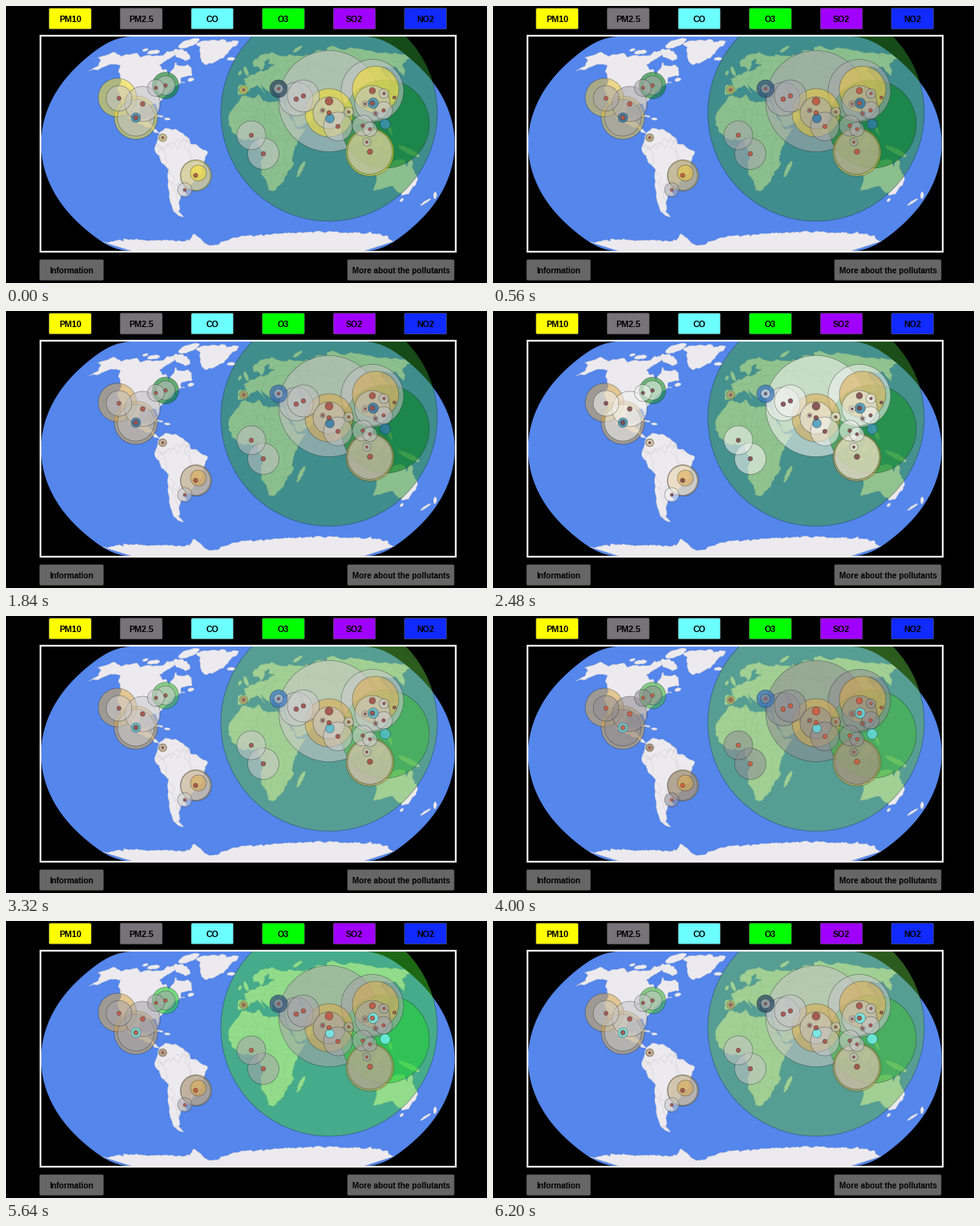
Write a matplotlib script that moves like this. It is 600 by 345 pixels and loops after 6240 ms.

```python
import matplotlib.pyplot as plt
import numpy as np
from matplotlib.animation import FuncAnimation
from matplotlib.colors import to_rgb
from matplotlib.patches import Circle, FancyBboxPatch, Polygon, Rectangle

W, H, DPI = 600, 345, 100
FRAMES, STEP = 156, 40
PX = 72 / DPI
OCEAN, LAND, BORDER = "#5486ec", "#eceaee", "#cbc9d0"
rng = np.random.default_rng(5)

fig = plt.figure(figsize=(W / DPI, H / DPI), dpi=DPI, facecolor="black")
ax = fig.add_axes([0, 0, 1, 1])
ax.set(xlim=(0, W), ylim=(H, 0))
ax.axis("off")


# --- map -------------------------------------------------------------
def project(points):
    """Natural Earth projection to stage pixels."""
    lon, lat = np.radians(np.array(points, float)).T
    a = lat ** 2
    b = a * a
    x = lon * (0.8707 - 0.131979 * a + b * (-0.013791 + b * (0.003971 * a - 0.001529 * b)))
    y = lat * (1.007226 + a * (0.015085 + b * (-0.044475 + 0.028874 * a - 0.005916 * b)))
    return np.column_stack([301.7 + 94.3 * x, 171.8 - 94.3 * y])


def roughen(points, depth=3, amount=0.09):
    """Fractal coast: displace the midpoint of every edge."""
    p = np.array(points, float)
    for _ in range(depth):
        edge = np.roll(p, -1, axis=0) - p
        normal = edge[:, ::-1] * (-1, 1)
        mid = p + edge / 2 + normal * rng.normal(0, amount, (len(p), 1))
        p = np.stack([p, mid], axis=1).reshape(-1, 2)
    return p


def fill(points, color=LAND):
    shape = Polygon(project(points), fc=color, ec=BORDER, lw=0.4 * PX, zorder=1)
    ax.add_patch(shape)
    shape.set_clip_path(globe)
    return shape


def continent(points, spacing=0):
    """Rough outline, crossed by wandering borders about spacing degrees apart."""
    shape = fill(roughen(points))
    if not spacing:
        return
    low, high = np.min(points, axis=0), np.max(points, axis=0)
    for axis in (0, 1):
        for v in np.arange(low[axis] + spacing, high[axis], spacing):
            s = np.linspace(low[1 - axis], high[1 - axis], 24)
            wander = v + np.cumsum(rng.normal(0, spacing / 7, 24))
            pts = np.column_stack([wander, s] if axis == 0 else [s, wander])
            line, = ax.plot(*project(pts).T, color=BORDER, lw=0.4 * PX, zorder=2)
            line.set_clip_path(shape)


def isle(x0, y0, x1, y1, width, color=LAND):
    """Spindle-shaped island between two ends."""
    a = np.linspace(0, 2 * np.pi, 12, endpoint=False)[:, None]
    mid, half = np.array([x0 + x1, y0 + y1]) / 2, np.array([x1 - x0, y1 - y0]) / 2
    side = half[::-1] * (-1, 1) / np.hypot(*half) * width
    fill(roughen(mid + half * np.cos(a) + side * np.sin(a), 1), color)


lats = np.linspace(-90, 90, 91)
rim = [(-180, v) for v in lats] + [(180, v) for v in lats[::-1]]
globe = ax.add_patch(Polygon(project(rim), fc=OCEAN, lw=0, zorder=0))

# North America
continent([(-168, 66), (-157, 71), (-128, 70), (-96, 68), (-94, 72), (-82, 69), (-87, 65),
           (-94, 60), (-82, 54), (-79, 51), (-77, 58), (-78, 62), (-70, 59), (-64, 60),
           (-56, 52), (-66, 50), (-65, 46), (-61, 46), (-70, 43), (-76, 36), (-81, 31),
           (-80, 25.5), (-84, 30), (-97, 28), (-97, 21), (-91, 18.5), (-87, 21), (-88, 16),
           (-83.5, 14), (-82, 9), (-77.5, 8), (-87, 12.5), (-97, 16), (-105.5, 20),
           (-113, 31), (-110, 23), (-117, 32.5), (-124, 41), (-124, 48), (-134, 58),
           (-147, 60.5), (-163, 55), (-158, 59)])
# Greenland
continent([(-73, 78.5), (-58, 75.5), (-51, 64), (-44, 60), (-23, 70), (-12, 81.5),
           (-32, 83.6), (-60, 82)])
# South America
continent([(-77.5, 8), (-72, 12), (-62, 10.5), (-51, 4), (-50, 0), (-35, -6), (-39, -14),
           (-41, -22), (-48, -26), (-54, -34), (-58, -34), (-57, -38), (-65, -42),
           (-69, -51), (-66, -55), (-74, -51), (-73, -37), (-70, -19), (-76, -14),
           (-81, -5), (-80, 0)], 14)
# Eurasia
continent([(-9, 37), (-2, 37), (3, 42), (9, 44), (16, 38), (13, 45), (22.5, 37), (23, 40.5),
           (29, 41), (27, 37), (36, 36.5), (35, 28), (43, 13), (55, 17), (59.5, 22.5),
           (48, 30), (57, 27), (67, 25), (73, 18), (77.5, 8), (80, 15), (90, 22), (94, 16),
           (98, 15), (103, 1.5), (100, 13), (105, 9), (108, 20), (114, 22.5), (121, 28),
           (119, 38), (126, 35), (129, 38), (140, 48), (136, 54.5), (143, 59), (155, 59),
           (156, 51), (164, 60), (180, 65), (180, 69), (140, 72.5), (110, 74), (104, 77),
           (80, 72), (67, 69), (44, 67), (40, 67), (28, 71), (15, 68.5), (5, 62), (6, 58.5),
           (12, 58), (14, 55.5), (18, 60), (18, 62.5), (24, 65.5), (22, 61), (29, 60),
           (21, 56), (10, 54), (4, 52), (-4, 48.5), (-1, 44), (-9, 43.5)], 17)
# Africa
continent([(-6, 35.5), (10, 37), (20, 31), (32, 31), (37, 20), (43, 11.5), (51, 12),
           (41, -2), (39.5, -8), (40.5, -15), (35, -21), (32.5, -28), (26, -34),
           (19, -34.5), (12, -17), (13.5, -8), (9, 0), (9, 4.5), (-8, 4.5), (-17, 14.5),
           (-17, 21), (-10, 30)], 10)
# Australia
continent([(114, -23), (122, -18), (130, -12), (136, -12), (140.5, -17.5), (142.5, -11),
           (146, -19), (153, -27), (150, -37.5), (144, -38.5), (136, -34), (130, -31.5),
           (116, -35)])

isle(29, 43, 41, 42.5, 1.6, OCEAN)        # Black Sea
isle(49, 46, 52.5, 37, 2, OCEAN)          # Caspian Sea
isle(-85, 22, -75, 20.3, 0.7)             # Cuba
isle(-74, 19, -68.5, 18.5, 0.8)           # Hispaniola
isle(-64, 65, -88, 73, 3)                 # Baffin
isle(-86, 77, -65, 82.5, 5)               # Ellesmere
isle(-117, 71, -103, 71, 2)               # Victoria
isle(-125, 73, -119, 73, 1.3)             # Banks
isle(-59, 48, -53, 48.5, 1.4)             # Newfoundland
isle(-23, 65, -14, 65, 1.4)               # Iceland
isle(-4, 58.5, 0.5, 51, 1.8)              # Great Britain
isle(-9.5, 52, -6.5, 55, 1.4)             # Ireland
isle(53, 71, 67, 76.5, 1.3)               # Novaya Zemlya
isle(44, -25, 50, -13, 1.8)               # Madagascar
isle(131, 32, 142, 42, 1.2)               # Japan
isle(141, 42.5, 145, 44, 1.1)             # Hokkaido
isle(142.5, 46, 142.5, 54, 0.7)           # Sakhalin
isle(120.5, 18.5, 126, 6.5, 1.3)          # Philippines
isle(95.5, 5.5, 105.5, -5.5, 1.6)         # Sumatra
isle(105.5, -6.7, 115, -8.3, 0.7)         # Java
isle(111, -2.5, 117.5, 6, 3)              # Borneo
isle(120, -5, 122, 1, 1)                  # Sulawesi
isle(131, -1.5, 150, -9.5, 2)             # New Guinea
isle(173.5, -36, 177.5, -41, 1.2)         # New Zealand
isle(167.5, -46, 173.5, -41, 1.2)
isle(145, -42, 148, -42, 1.3)             # Tasmania

# Antarctica: a tilted cap with two bays and a peninsula
lon = np.linspace(-180, 180, 150)
bump = lambda centre, width: np.exp(-((lon - centre) / width) ** 2)
coast = (-71.5 + 4 * np.sin(np.radians(lon)) - 6.5 * bump(-45, 17) + 8 * bump(-61, 6)
         - 5 * (bump(-180, 22) + bump(180, 14)) + rng.normal(0, 0.5, lon.size))
fill(np.vstack([np.column_stack([lon, coast]),
                np.column_stack([lon[::-1], np.full(lon.size, -90)])]))


# --- pollution marks ---------------------------------------------------
def signal(t, *keys):
    return np.interp(t, *zip(*keys))


def blend(base, *steps):
    """Move from the base colour towards others by the given weights."""
    base = np.array(to_rgb(base))
    rgb = base + sum(w * (np.array(to_rgb(c)) - base) for c, w in steps)
    return np.clip(rgb, 0, 1)


def colours(t):
    """Face colour of every kind of mark at t seconds."""
    haze = signal(t, (0, .6), (1.16, .05), (2.48, 1), (3.32, .65), (4, .1), (5.04, 0), (6.2, .6))
    soft = signal(t, (2.2, .1), (3.3, 1), (4, 1), (5.04, 0), (6.2, 1))
    vivid = signal(t, (4, 0), (5.04, 1), (6.2, 0))
    cyan = signal(t, (0, .35), (1.2, 0), (4, .85), (5, 1))
    faces = {
        "o3": (blend("#28912d", ("#58b63c", soft), ("#19eb14", vivid)), 0.5),
        "o3b": (blend("#007d1c", ("#41b941", soft), ("#00eb28", vivid)), 0.6),
        "pm10": (blend("#fae128", ("#dcaa4b", min(t / 1.2, 1))), 0.55),
        "pm25": (blend("#85838a", ("#f2f2f0", haze)), 0.57),
        "co": (blend("#1e5a96", ("#6ef0f0", cyan)), 0.8),
        "no2": (blend("#2c4860", ("#3c78c8", np.sin(np.pi * t / 6.24))), 0.75),
        "city": (blend("#dc5a3c", ("#643c4a", 0.8 * haze)), 0.85),
    }
    return {k: (*rgb, a) for k, (rgb, a) in faces.items()}


# Stations: x, y, haze radius
STATIONS = [
    (141, 115, 16), (170.5, 122, 22), (162, 139, 23), (187, 102, 10.5), (199, 99, 12),
    (195.5, 164, 4), (236.5, 211, 18.5), (223, 229, 9), (296.5, 104.5, 3), (340, 103, 6),
    (306, 161, 18), (321, 184, 19.5), (362, 116, 21), (371, 112, 20), (403, 118.5, 63),
    (403, 133, 20), (395, 130, 3), (414, 150, 18), (427.5, 132, 6), (457, 105.5, 39),
    (457, 121, 22), (471.5, 109, 6), (484.5, 114, 2), (448, 122, 4), (471, 130, 11),
    (461, 134, 3), (445, 149, 13), (454, 153.5, 9), (450, 169.5, 5), (454, 181.5, 28),
]
GASES = [
    ("o3", 403, 133, 135), ("o3b", 473, 147, 55), ("o3b", 199, 99, 16.5),
    ("pm10", 139, 114, 24), ("pm10", 162, 139, 27), ("pm10", 237, 211, 19.5),
    ("pm10", 240, 208, 10), ("pm10", 195.5, 164, 5), ("pm10", 296.5, 104.5, 5),
    ("pm10", 403, 133, 30), ("pm10", 461, 104, 29), ("pm10", 454, 182, 30),
    ("no2", 340, 103, 11), ("co", 162, 139, 6), ("co", 404, 140, 5.5),
    ("co", 458, 121, 6.5), ("co", 473, 147, 6.5),
]
# Large circles lie at the bottom, the station dots on top
marks = GASES + [("pm25", *s) for s in STATIONS]
marks.sort(key=lambda m: -m[3])
marks += [("city", x, y, max(1.7, 0.2 + 0.6 * r ** 0.5)) for x, y, r in STATIONS]

view = Rectangle((43, 37), 517.5, 269, fc="none", ec="white", lw=2.2 * PX, zorder=20)
ax.add_patch(view)

circles = []
for kind, x, y, r in marks:
    c = Circle((x, y), r, ec=(0.08, 0.1, 0.12, 0.6), lw=0.5 * PX, zorder=5)
    ax.add_patch(c)
    c.set_clip_path(view)
    circles.append((kind, c))


# --- buttons -----------------------------------------------------------
def button(x, y, w, h, color, label, size=10):
    ax.add_patch(FancyBboxPatch((x, y), w, h, boxstyle="round,pad=0,rounding_size=1.5",
                                fc=color, ec="#55555c", lw=0.6 * PX, zorder=21))
    ax.text(x + w / 2, y + h / 2 + 4.2, label, ha="center", va="baseline", color="black",
            family="Liberation Sans", weight="bold", size=size * PX, zorder=22)


TABS = [("PM10", "#ffff00"), ("PM2.5", "#767478"), ("CO", "#6cffff"),
        ("O3", "#00ff00"), ("SO2", "#a000ff"), ("NO2", "#102aff")]
for i, (label, color) in enumerate(TABS):
    button(53.7 + 88.65 * i, 2.8, 52.6, 26, color, label, 10.6)
button(42, 316, 79.5, 25.5, "#666666", "Information")
button(426, 316, 133, 25.5, "#666666", "More about the pollutants")


def update(i):
    now = colours(i * STEP / 1000)
    for kind, c in circles:
        c.set_facecolor(now[kind])
    return [c for _, c in circles]


anim = FuncAnimation(fig, update, frames=FRAMES, interval=STEP, repeat=True,
                     repeat_delay=0, blit=False)
plt.show()
```
